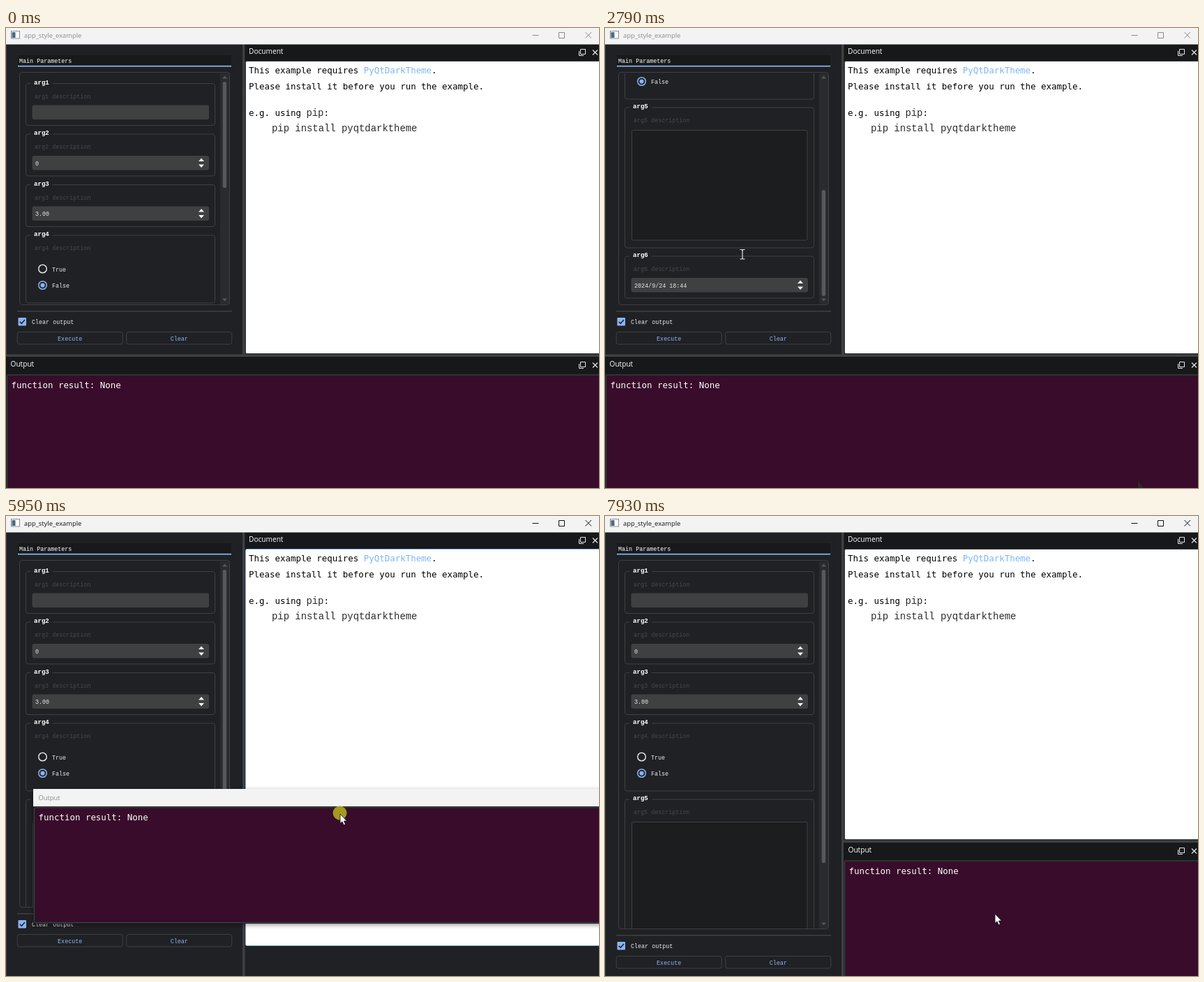
Recreate the animation shown at these times as an HTML page. Size 850x659 px, loop 8 s.

```html
<!DOCTYPE html>
<html lang="en">
<head>
<meta charset="utf-8">
<title>app_style_example</title>
<style>
  html, body { margin: 0; width: 100%; height: 100%; overflow: hidden; background: #202124; }
  svg { display: block; }
  text { white-space: pre; }
  .ui { font: 10.15px "Open Sans", "Noto Sans", sans-serif; }
  .cap { font: 9.35px "Open Sans", "Noto Sans", sans-serif; }
  .form { font: 8.4px "Liberation Mono", monospace; fill: #e4e7eb; }
  .title { font-weight: bold; fill: #fff; }
  .hint { fill: #48494c; }
  .body { font: 12.45px "DejaVu Sans Mono", monospace; }
  .code { font: 13.9px "Liberation Mono", monospace; fill: #2b2b2b; }
  .accent { fill: #8ab4f7; }
  .frame { fill: none; stroke: #3f4042; }
  .field { fill: #3f4042; }
  .light { fill: #f0f1f2; }
</style>
</head>
<body>
<svg id="stage" width="850" height="659" viewBox="0 0 850 659"></svg>
<script>
const rect = (x, y, w, h, attrs = '') =>
  `<rect x="${x}" y="${y}" width="${w}" height="${h}" ${attrs}/>`;
const text = (x, y, cls, str, attrs = '') =>
  `<text x="${x}" y="${y}" class="${cls}" ${attrs}>${str}</text>`;
const path = (d, attrs) => `<path d="${d}" ${attrs}/>`;

// ---- form parts ----
const group = (n, top, height, inner) => `<g transform="translate(0 ${top})">
  ${rect(28.5, 0.5, 271, height, 'rx="3.5" class="frame"')}
  ${rect(35, -1, 32, 3, 'fill="#202124"')}
  ${text(40, 1.5, 'form title', 'arg' + n, 'style="font-size:9.1px"')}
  ${text(41, 21.5, 'form hint', `arg${n} description`)}
  ${inner}</g>`;
const field = (value, spin = true) =>
  rect(37.5, 31.5, 253.5, 20.5, 'rx="3" class="field"') + text(42, 45, 'form', value) +
  (spin ? path('M276 39.5L280 35L284 39.5ZM276 44L280 48.5L284 44Z', 'class="light"') : '');
const radio = (y, label, on) =>
  `<circle cx="52.5" cy="${y}" r="5.8" fill="none" stroke="${on ? '#8ab4f7' : '#dfe1e5'}" stroke-width="1.5"/>` +
  (on ? `<circle cx="52.5" cy="${y}" r="3.1" class="accent"/>` : '') + text(66, y + 3.5, 'form', label);
const button = (x, label) => rect(x, 435.5, 151, 17.5, 'rx="3" class="frame"') +
  text(x + 75.5, 447.5, 'form', label, 'text-anchor="middle" style="fill:#8ab4f7"');

const form = group(1, 79, 60, field('', false)) + group(2, 151.5, 60, field('0')) +
  group(3, 224, 60, field('3.00')) +
  group(4, 296.5, 97, radio(48.5, 'True', false) + radio(72, 'False', true)) +
  group(5, 405.5, 201, rect(38.5, 33, 251.5, 157.5, 'rx="2" fill="#1c1d1f" stroke="#3f4042"')) +
  group(6, 618.5, 60, field('2024/9/24 18:44'));

// ---- dock parts ----
const dockIcons = y => `<g transform="translate(0 ${y})" fill="none" stroke="#e4e7eb">
  ${path('M823.5 -4.5H830.5V2.5H823.5ZM821.5 -2V4.5H828', '')}
  ${path('M841 -3.5L848 3.5M848 -3.5L841 3.5', 'stroke-width="1.2"')}</g>`;
const resultPane = (y, h) => rect(0, y, 860, h, 'fill="#202124"') +
  rect(1.5, y + 1.5, 870, h - 3, 'rx="2" class="frame"') +
  rect(3, y + 3, 870, h - 6, 'fill="#380c2a"') +
  text(7.5, y + 20, 'body', 'function result: None', 'fill="#fff"');

const stage = document.getElementById('stage');
stage.innerHTML = `
  <defs><clipPath id="view">${rect(20, 65, 287, 331, 'id="viewRect"')}</clipPath>
  <filter id="shadow" x="-5%" y="-10%" width="110%" height="125%">
    <feDropShadow dx="0" dy="2" stdDeviation="3" flood-opacity=".4"/></filter></defs>
  ${rect(0, 0, 850, 659, 'fill="#202124"')}
  ${rect(0, 23, 1, 636, 'fill="#3a3b3e"')}

  ${rect(17, 39, 306, 15, 'fill="#18191b"')}
  ${text(19, 50, 'form', 'Main Parameters', 'style="fill:#fff"')}
  ${rect(17, 53.8, 306, 1.7, 'class="accent"')}
  <g clip-path="url(#view)"><g id="form">${form}</g></g>
  ${rect(307, 65, 13, 331, 'id="bar" fill="#2a2b2e"')}
  ${path('M310 72.5L313.5 68.5L317 72.5Z', 'fill="#56575a"')}
  ${rect(310.7, 77, 5.3, 152, 'id="thumb" rx="2.6" fill="#58595c"')}
  ${rect(19.5, 63.5, 301, 333, 'id="areaFrame" rx="4" class="frame"')}
  <g id="footer">
    ${path('M310 387.5L313.5 391.5L317 387.5Z', 'fill="#56575a"')}
    ${rect(16, 405, 308, 1.5, 'class="field"')}
    ${rect(17.5, 415, 11.5, 11.5, 'rx="1" class="accent"')}
    ${path('M19.8 420.8L22.3 423.3L27 418', 'fill="none" stroke="#202124" stroke-width="1.5"')}
    ${text(37, 424, 'form', 'Clear output')}
    ${button(16.2, 'Execute')}${button(172.7, 'Clear')}
  </g>

  ${rect(339, 23, 3.5, 636, 'class="field"')}
  ${rect(342.5, 23, 508, 25, 'fill="#17181a"')}
  ${text(348, 37, 'ui', 'Document', 'fill="#fff"')}${dockIcons(35)}
  ${rect(343.5, 47.5, 520, 419, 'id="page" rx="2" fill="#fff" stroke="#3f4042"')}
  ${text(348, 65, 'body', 'This example requires <tspan fill="#7db7f2">PyQtDarkTheme</tspan>.')}
  ${text(348, 87.5, 'body', 'Please install it before you run the example.')}
  ${text(348, 126, 'body', 'e.g. using <tspan class="code">pip</tspan>:')}
  ${text(381, 148, 'code', 'pip install pyqtdarktheme')}
  ${rect(342.5, 472, 508, 187, 'id="preview" fill="#5f7088"')}

  <g id="dock">
    ${rect(0, -3.5, 860, 4, 'class="field"')}${rect(0, 0, 860, 25, 'fill="#17181a"')}
    ${text(6.5, 14, 'ui', 'Output', 'fill="#fff"')}${resultPane(24.5, 180)}
  </g>
  <g id="dockIcons">${dockIcons(0)}</g>
  ${path('M764 649V659H772Z', 'id="smudge" fill="#2b2a2d"')}

  <g id="floating">
    ${rect(0, 0, 860, 193, 'fill="#202124" filter="url(#shadow)"')}
    ${resultPane(25, 168)}${rect(0, 0, 860, 25, 'fill="#f3f3f3"')}
    ${text(7.5, 16, 'cap', 'Output', 'fill="#8b8b8b"')}
  </g>

  ${rect(0, 0, 850, 23.5, 'fill="#f3f3f3"')}
  ${rect(7.5, 4.5, 12, 10.5, 'fill="#fff" stroke="#8a9099"')}
  ${rect(8.5, 6, 5, 8, 'fill="#4d6a82"')}
  <g id="caption">
    ${text(26, 14, 'cap', 'app_style_example', 'fill="currentColor"')}
    ${path('M754.5 10.5H763.5M792.5 6.5H800.5V14.5H792.5ZM830.5 6L839 14.5M839 6L830.5 14.5', 'fill="none" stroke="currentColor"')}
  </g>

  <g id="pointer">
    <circle id="press" cx="-.5" cy="-1.5" r="10" fill="#a5991f"/>
    ${path('M0 0V13.5L3 10.8L5.2 15.7L7.5 14.6L5.4 10H9.5Z', 'id="arrow" fill="#fff" stroke="#111" stroke-width=".8"')}
    ${path('M-3.5 -7.5H-1L0 -6.5L1 -7.5H3.5M0 -6.5V5M-3.5 6H-1L0 5L1 6H3.5', 'id="beam" fill="none" stroke="#e8e8e8" stroke-width="1.2"')}
    ${path('M-1.5 9V0Q-1.5 -1.8 0 -1.8Q1.6 -1.8 1.6 0V5Q4 4 4.6 6Q6.5 5.2 7.2 7Q8.8 6.6 8.8 9V12L7 17H0L-5.5 10.5Q-6 8 -3.6 8.4ZM1.6 5V9M4.6 6V9.5M7.2 7V10', 'id="hand" fill="#fff" stroke="#111"')}
  </g>`;

const ui = Object.fromEntries([...stage.querySelectorAll('[id]')].map(e => [e.id, e]));
const set = (el, name, value) => el.setAttribute(name, value);
const move = (el, x, y) => set(el, 'transform', `translate(${x} ${y})`);
const show = (el, on) => set(el, 'display', on ? 'inline' : 'none');

// ---- timing: motion advances in evenly timed steps ----
function stepped(t, start, end, count) {
  if (t < start) return 0;
  const gap = (end - start) / (count - 1);
  return Math.min(count, Math.floor((t - start + 12) / gap) + 1) / count;
}
function along(points, p) {
  if (p <= points[0][0]) return points[0].slice(1);
  const i = points.findIndex(point => point[0] >= p);
  const [p0, x0, y0] = points[i - 1], [p1, x1, y1] = points[i];
  const k = (p - p0) / (p1 - p0);
  return [Math.round(x0 + (x1 - x0) * k), Math.round(y0 + (y1 - y0) * k)];
}

// start, end, steps, [progress, x, y] waypoints
const pointerMoves = [
  [460, 1210, 12, [[1 / 12, 764, 649], [.4, 520, 440], [.75, 350, 325], [1, 319, 308]]],
  [1280, 1620, 6, [[0, 319, 308], [.6, 225, 318], [1, 198, 325]]],
  [4200, 5000, 13, [[0, 198, 325], [.25, 480, 170], [6 / 13, 600, 61], [.75, 597, 57], [1, 592, 40]]],
  [5070, 5820, 12, [[0, 592, 40], [.4, 500, 300], [.75, 441, 482], [11 / 12, 440, 482], [1, 448, 470]]],
  [5900, 6020, 3, [[0, 448, 470], [2 / 3, 479, 427], [1, 480, 427]]],
  [6440, 6920, 8, [[0, 480, 427], [1, 627, 614]]],
  [7380, 7930, 9, [[.33, 627, 614], [1, 559, 570]]],
];
function pointerAt(t) {
  const current = pointerMoves.filter(m => m[0] <= t).pop() || pointerMoves[0];
  const [start, end, count, points] = current;
  return along(points, stepped(t, start, end, count));
}
function scrollAt(t) {
  if (t >= 3670) return 0;
  if (t >= 3320) return 141;
  return 125 * stepped(t, 1770, 2030, 5) + 50 * stepped(t, 2250, 2310, 2) +
    117 * stepped(t, 2450, 2790, 6);
}

const PRESS = 5690, FLOAT = 5820, HOVER = 6690, RELEASE = 7380, DOCKED = 7510;

function render(t) {
  const [x, y] = pointerAt(t);
  const scroll = scrollAt(t);
  const opened = stepped(t, 5900, 6020, 3);
  const extra = along([[0, 0, 0], [2 / 3, 164, 149], [1, 195, 191]], opened);
  const grow = extra[0];

  move(ui.form, 0, -Math.round(scroll));
  move(ui.footer, 0, grow);
  set(ui.viewRect, 'height', 331 + grow);
  set(ui.bar, 'height', 331 + grow);
  set(ui.areaFrame, 'height', 333 + grow);
  set(ui.thumb, 'y', 77 + scroll * 155 / 292);
  set(ui.thumb, 'height', 152 + grow * 268 / 195);

  const floating = t >= FLOAT && t < DOCKED;
  const hovering = t >= HOVER && t < DOCKED;
  const docked = t >= DOCKED;
  const pageHeight = docked ? 416 : hovering ? 419.5 : 419 + extra[1];
  set(ui.page, 'height', pageHeight);
  set(ui.page, 'stroke', floating ? '#8ab4f7' : '#3f4042');
  show(ui.preview, hovering);

  show(ui.dock, !floating);
  show(ui.dockIcons, !floating);
  move(ui.dock, docked ? 342 : 0, docked ? 468 : 471);
  move(ui.dockIcons, 0, docked ? 480 : 483);

  const settle = stepped(t, RELEASE, DOCKED, 3);
  const [wx, wy] = t < RELEASE ? [x - 440, y - 36] : along([[0, 187, 578], [1, 342, 468]], settle);
  show(ui.floating, floating);
  move(ui.floating, wx, wy);

  set(ui.caption, 'color', t < PRESS ? '#8b8b8b' : '#111');
  show(ui.smudge, t >= 520 && t < PRESS);

  const beam = t >= 2030 && t < 3670;
  const hand = x > 513 && x < 611 && y > 50 && y < 74;
  show(ui.pointer, t >= 460);
  show(ui.press, t >= PRESS && t < RELEASE);
  show(ui.beam, beam);
  show(ui.hand, hand);
  show(ui.arrow, !beam && !hand);
  move(ui.pointer, beam ? x - 1 : x, y);
}

const origin = performance.now();
function tick() {
  render((performance.now() - origin) % 8000);
  requestAnimationFrame(tick);
}
tick();
</script>
</body>
</html>
```
